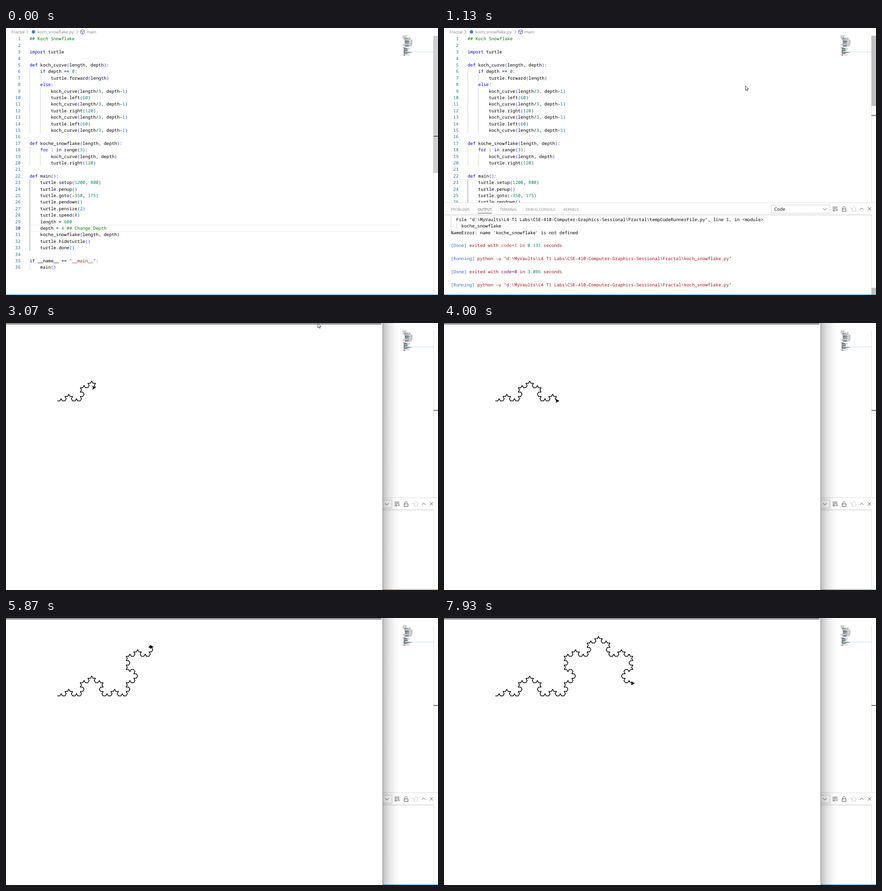
An HTML page with a canvas that plays this animation: 951x589 px, repeating every 8000 ms.

```html
<!DOCTYPE html>
<html lang="en">
<head>
<meta charset="utf-8">
<title>Koch Snowflake</title>
<style>
html, body { margin: 0; width: 100%; height: 100%; overflow: hidden; background: #fff; }
canvas { display: block; }
</style>
</head>
<body>
<canvas id="stage" width="951" height="589"></canvas>
<script>
const ctx = document.getElementById('stage').getContext('2d');
const LOOP = 8000, FPS = 15;
const CHAR = 5.83, LINE = 14.4;
const MONO = '9.72px "Noto Sans Mono", monospace';
const ui = size => `${size}px "Open Sans", sans-serif`;

const SOURCE = `## Koch Snowflake

import turtle

def koch_curve(length, depth):
    if depth == 0:
        turtle.forward(length)
    else:
        koch_curve(length/3, depth-1)
        turtle.left(60)
        koch_curve(length/3, depth-1)
        turtle.right(120)
        koch_curve(length/3, depth-1)
        turtle.left(60)
        koch_curve(length/3, depth-1)

def koche_snowflake(length, depth):
    for i in range(3):
        koch_curve(length, depth)
        turtle.right(120)

def main():
    turtle.setup(1200, 800)
    turtle.penup()
    turtle.goto(-350, 175)
    turtle.pendown()
    turtle.pensize(2)
    turtle.speed(0)
    length = 600
    depth = 4 ## Change Depth
    koche_snowflake(length, depth)
    turtle.hideturtle()
    turtle.done()

if __name__ == "__main__":
    main()`.split('\n');

const FOLDER = 'd:\\MyVaults\\L4 T1 Labs\\CSE-410-Computer-Graphics-Sessional\\Fractal\\';
const BLACK = '#000', INFO = '#316bcd', STRING = '#a31515', NUMBER = '#098658';
const running = [['[Running] ', INFO], [`python -u "${FOLDER}koch_snowflake.py"`, STRING]];
const done = (code, color, seconds) => [['[Done] ', INFO], ['exited with ', STRING],
  ['code=' + code, color], [' in ', STRING], [seconds, NUMBER], [' seconds', STRING]];
const OUTPUT = [
  [['Traceback (most recent call last):', BLACK]],
  [[`  File "${FOLDER}tempCodeRunnerFile.py", line 1, in <module>`, BLACK]],
  [['    koche_snowflake', BLACK]],
  [["NameError: name 'koche_snowflake' is not defined", BLACK]],
  [], done(1, '#cd3131', '0.131'),
  [], running,
  [], done(0, '#800080', '3.086'),
  [], running
];

// Splits a line of Python into [text, colour] runs.
const TOKEN = /(##.*)|("[^"]*")|\b(def|import|if|else|for|in)\b|\b(\d+)\b|([()])|\b(i)\b|\s+|[^\s()"#]+?(?=\b|\W|$)/g;
const COLORS = ['#008000', STRING, '#0000ff', NUMBER, '#0431fa', '#999'];
const CODE = SOURCE.map(line => [...line.matchAll(TOKEN)].map(m => {
  const kind = m.slice(1).findIndex(Boolean);
  return [m[0], COLORS[kind] || BLACK];
}));

function rect(x, y, w, h, color) {
  ctx.fillStyle = color;
  ctx.fillRect(x, y, w, h);
}

function text(str, x, y, color, font, align = 'left') {
  ctx.font = font;
  ctx.textAlign = align;
  ctx.fillStyle = color;
  ctx.fillText(str, x, y);
}

function runs(line, x, y) {
  for (const [str, color] of line) {
    if (str.trim()) text(str, x, y, color, MONO);
    x += str.length * CHAR;
  }
}

function icon(path, x, y, color = '#424242', width = 1) {
  ctx.save();
  ctx.translate(x, y);
  ctx.strokeStyle = color;
  ctx.lineWidth = width;
  ctx.stroke(new Path2D(path));
  ctx.restore();
}

function clipped(x, y, w, h, draw) {
  ctx.save();
  ctx.beginPath();
  ctx.rect(x, y, w, h);
  ctx.clip();
  draw();
  ctx.restore();
}

function breadcrumbs() {
  const gray = '#858585', font = ui(9.25), arrow = 'M-2-3.5L1.5 0L-2 3.5';
  text('Fractal', 12, 12, gray, font);
  icon(arrow, 47, 8.5, gray);
  ctx.fillStyle = '#4584b6';
  ctx.beginPath();
  ctx.arc(60.5, 8.5, 3.8, 0, 7);
  ctx.fill();
  text('koch_snowflake.py', 69, 12, gray, font);
  icon(arrow, 157, 8.5, gray);
  icon('M0-5L4.3-2.5V2.5L0 5L-4.3 2.5V-2.5ZM-4.3-2.5L0 0L4.3-2.5M0 0V5', 168.5, 8.5, '#652d90', 0.9);
  text('main', 177, 12, gray, font);
}

function codeLines(caretOn) {
  rect(52, 434.5, 816, 1, '#e8e8e8');
  rect(52, 448.3, 816, 1, '#e8e8e8');
  CODE.forEach((line, i) => {
    const y = 27.4 + i * LINE, n = i + 1;
    text(n, 32, y, n === 30 ? '#0b216f' : '#237893', MONO, 'right');
    const indent = SOURCE[i].search(/\S/);
    for (let col = 0; col < indent; col += 4)
      rect(col ? 75 : 52, 16.6 + i * LINE, 1, LINE, n > 22 && n < 34 ? '#939393' : '#d3d3d3');
    runs(line, 52, y);
  });
  if (caretOn) rect(221, 435, 1.5, 14, BLACK);
}

function minimap() {
  rect(873, 52.3, 68, 1, '#b5def5');
  ctx.globalAlpha = 0.62;
  CODE.forEach((line, i) => {
    let x = 873;
    for (const [str, color] of line) {
      if (str.trim()) rect(x, 16.6 + i * 1.24, str.length * 0.6, 0.95, color);
      x += str.length * 0.6;
    }
  });
  ctx.globalAlpha = 1;
}

function slider(y, h, alpha) {
  rect(941, y, 10, h, `rgba(100,100,100,${0.4 * alpha})`);
}

function panel(alpha) {
  rect(0, 385, 951, 203, '#fff');
  rect(0, 385, 951, 1, '#dcdcdc');
  clipped(0, 411.5, 941, 176, () => {
    rect(15, 415, 1, 29.5, '#d3d3d3');
    rect(27, 430, 1, 14.5, '#d3d3d3');
    OUTPUT.forEach((line, i) => runs(line, 15, 411.2 + i * 14.45));
  });
  const shade = ctx.createLinearGradient(0, 411, 0, 415);
  shade.addColorStop(0, '#ddd');
  shade.addColorStop(1, '#ddd0');
  rect(0, 411, 941, 4, shade);
  rect(941, 412, 1, 176, '#dedede');
  slider(573, 15, alpha);

  const tabs = [['PROBLEMS', 15], ['OUTPUT', 74], ['TERMINAL', 123], ['DEBUG CONSOLE', 180], ['KERNELS', 263]];
  for (const [name, x] of tabs)
    text(name, x, 402.5, x === 74 ? '#424242' : '#818181', ui(7.95));
  rect(74, 408, 31.5, 1, '#424242');

  icon('M720.5 390.5H849.5V408.5H720.5Z', 0, 0, '#cecece');
  text('Code', 727, 403, BLACK, ui(10));
  icon('M-4-2L0 2L4-2', 838.5, 399.5);
  icon('M-5-3.5H5.5M-5-.5H5.5M-5 2.5H1M-5 5H1M2.5 1.5L6 5M6 1.5L2.5 5', 860.5, 398.5);
  icon('M-4-.5H4.5V5H-4ZM-2.5-.5V-3C-2.5-6 3-6 3-3V-2', 880.5, 399.5);
  icon('M-1-4.5H3L5.5-2V5H-2.5V1M-5.5-4V0H-1M-3-2L-1 0L-3 2', 901, 399, '#c8c8c8');
  icon('M-4 2L0-2L4 2', 919.5, 399);
  icon('M-3.5-3.5L3.5 3.5M3.5-3.5L-3.5 3.5', 936.5, 399);
}

function editor(t) {
  const panelOpen = t >= 860;
  const sliderAlpha = t < 260 ? 0.75 : t < 330 ? 0.88 : Math.max(0, Math.min(1, (2100 - t) / 800));
  rect(0, 0, 951, 589, '#fff');
  breadcrumbs();
  clipped(0, 16, 941, panelOpen ? 369 : 572, () => codeLines(t >= 260 && t < 790));
  minimap();
  rect(941, 17, 1, 571, '#dedede');
  slider(17, panelOpen ? 155 : 303, sliderAlpha);
  rect(941, panelOpen ? 192 : 238, 10, 1.5, '#424242');
  if (panelOpen) panel(sliderAlpha);
  rect(0, 588, 951, 1, '#1f8ad2');
}

// Turtle program: a number is a turn in degrees, 'F' is one segment forward.
const SCALE = 0.757, SEGMENT = 600 / 81 * SCALE;
const START = [113, 171.8], HOME = [START[0] + 350 * SCALE, START[1] + 175 * SCALE];
const koch = depth => depth
  ? [60, -120, 60].reduce((ops, turn) => [...ops, turn, ...koch(depth - 1)], koch(depth - 1))
  : ['F'];
const OPS = koch(4);

// Piecewise linear value through [time, value] keys.
function track(keys, t) {
  const i = keys.findIndex(key => key[0] > t);
  if (i === 0) return keys[0][1];
  if (i < 0) return keys[keys.length - 1][1];
  const [t0, a] = keys[i - 1], [t1, b] = keys[i];
  return a + (b - a) * (t - t0) / (t1 - t0);
}
const PROGRESS = [[1867, 0], [2067, 12], [3067, 72], [3800, 109], [4667, 163], [5000, 183],
  [5533, 217], [6800, 297], [7267, 325], [7933, 369]];

function turtleArrow(x, y, heading) {
  ctx.save();
  ctx.translate(x, y);
  ctx.rotate(-heading * Math.PI / 180);
  ctx.scale(SCALE, SCALE);
  const shape = new Path2D('M0 0L-9-5L-7 0L-9 5Z');
  ctx.fillStyle = ctx.strokeStyle = BLACK;
  ctx.lineWidth = 1;
  ctx.fill(shape);
  ctx.stroke(shape);
  ctx.restore();
}

function drawing(t) {
  if (t < 1867) {
    const p = Math.max(0, (t - 1316) / 550);
    turtleArrow(HOME[0] + (START[0] - HOME[0]) * p, HOME[1] + (START[1] - HOME[1]) * p, 0);
    return;
  }
  let [x, y] = START, heading = 0;
  ctx.beginPath();
  ctx.moveTo(x, y);
  for (const op of OPS.slice(0, Math.round(track(PROGRESS, t)))) {
    if (op === 'F') {
      x += SEGMENT * Math.cos(heading * Math.PI / 180);
      y -= SEGMENT * Math.sin(heading * Math.PI / 180);
      ctx.lineTo(x, y);
    } else heading += op;
  }
  ctx.strokeStyle = BLACK;
  ctx.lineWidth = 1.5;
  ctx.lineJoin = 'round';
  ctx.stroke();
  ctx.lineJoin = 'miter';
  turtleArrow(x, y, heading);
}

function turtleWindow(t) {
  const shadow = ctx.createLinearGradient(830, 0, 868, 0);
  shadow.addColorStop(0, 'rgba(0,0,0,.24)');
  shadow.addColorStop(0.35, 'rgba(0,0,0,.11)');
  shadow.addColorStop(0.7, 'rgba(0,0,0,.03)');
  shadow.addColorStop(1, 'rgba(0,0,0,0)');
  rect(830, 0, 38, 589, shadow);
  rect(0, 0, 829, 589, '#fff');
  rect(827, 0, 2, 589, '#f0f0f0');
  rect(829, 0, 1, 589, '#8c8c8c');
  rect(0, 1, 826.5, 1.7, '#3a3a3a');
  drawing(t);
}

const MOUSE_X = [[933, 925], [1133, 663], [1267, 663], [1667, 528], [2133, 528], [2800, 686]];
const MOUSE_Y = [[933, 22], [1133, 127], [1267, 127], [1667, 266], [2133, 266], [2800, 1], [3000, 1], [3067, 0]];

function mouse(t) {
  if (t < 930 || t > 3100) return;
  const shape = new Path2D('M.5 .5V10.4L2.8 8.3L4.3 11.7L5.9 11L4.4 7.6H7.5Z');
  ctx.save();
  ctx.translate(track(MOUSE_X, t), track(MOUSE_Y, t));
  ctx.fillStyle = '#fff';
  ctx.strokeStyle = '#222';
  ctx.lineWidth = 0.9;
  ctx.fill(shape);
  ctx.stroke(shape);
  ctx.restore();
}

function frame() {
  const now = performance.now() % LOOP;
  const t = Math.floor((now + 4) * FPS / 1000) * 1000 / FPS % LOOP;
  ctx.textRendering = 'geometricPrecision';
  editor(t);
  if (t >= 1260) turtleWindow(t);
  mouse(t);
  requestAnimationFrame(frame);
}
frame();
</script>
</body>
</html>
```
